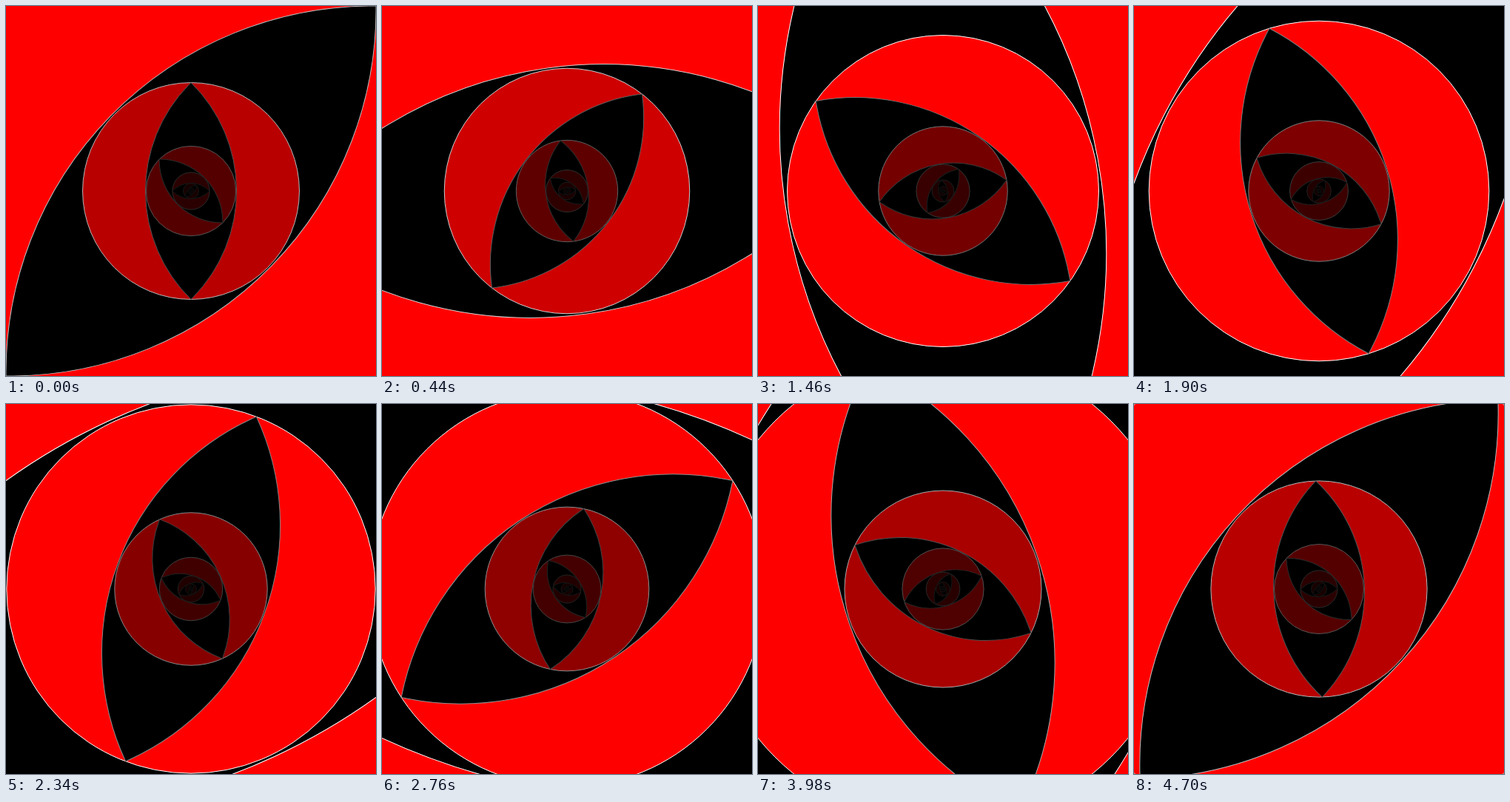
An HTML page with a canvas for the animation above (4720 ms loop, 500 px wide and 500 px high).

```html
<!DOCTYPE html>
<html lang="en">
<head>
<meta charset="utf-8">
<title>Nested eyes</title>
<style>
  html, body { margin: 0; width: 100%; height: 100%; overflow: hidden; background: #000; }
  canvas { display: block; }
</style>
</head>
<body>
<canvas id="stage" width="500" height="500"></canvas>
<script>
const ctx = document.getElementById("stage").getContext("2d");
const SIZE = 500;
const STEP_MS = 20;
const STEPS = 236;
const LEVELS = 10;
const RATIO = Math.SQRT2 - 1; // size of each eye relative to the one around it
const OUTER = SIZE / Math.SQRT2;
const TURN = Math.PI * 2 + Math.PI / 4;

// lid arcs, relative to the eye radius
const LID_RADIUS = 1.4;
const LID_OFFSET = Math.sqrt(LID_RADIUS ** 2 - 1);
const LID_HALF = Math.asin(1 / LID_RADIUS);

const shade = r => Math.min(255, Math.round(10 + 245 * Math.pow(r / 210, 0.95)));
const gray = v => `rgb(${v},${v},${v})`;

function paint(fill, line) {
  ctx.fillStyle = fill;
  ctx.strokeStyle = line;
  ctx.fill();
  ctx.stroke();
}

function addLid(r, side) {
  const middle = side * Math.PI / 2;
  ctx.arc(0, -side * r * LID_OFFSET, r * LID_RADIUS, middle - LID_HALF, middle + LID_HALF);
}

function drawEye(r, angle) {
  const tone = shade(r);
  ctx.beginPath();
  ctx.arc(0, 0, r, 0, Math.PI * 2);
  paint(`rgb(${tone},0,0)`, gray(tone));

  ctx.save();
  ctx.rotate(angle);
  ctx.beginPath();
  addLid(r, -1);
  addLid(r, 1);
  ctx.closePath();
  paint("#000", gray(shade(r * RATIO)));
  ctx.restore();
}

function draw(progress) {
  ctx.setTransform(1, 0, 0, 1, 0, 0);
  ctx.fillStyle = "#000";
  ctx.fillRect(0, 0, SIZE, SIZE);
  ctx.translate(SIZE / 2, SIZE / 2);
  ctx.lineWidth = 1;
  // each eye grows linearly to the size of the one around it
  const growth = 1 + (1 / RATIO - 1) * progress;
  for (let k = 0; k < LEVELS; k++) {
    drawEye(OUTER * RATIO ** k * growth, TURN * progress - (k + 1) * Math.PI / 4);
  }
}

const start = performance.now();
function tick() {
  const step = Math.floor((performance.now() - start) / STEP_MS) % STEPS;
  draw(step / STEPS);
  requestAnimationFrame(tick);
}
tick();
</script>
</body>
</html>
```
